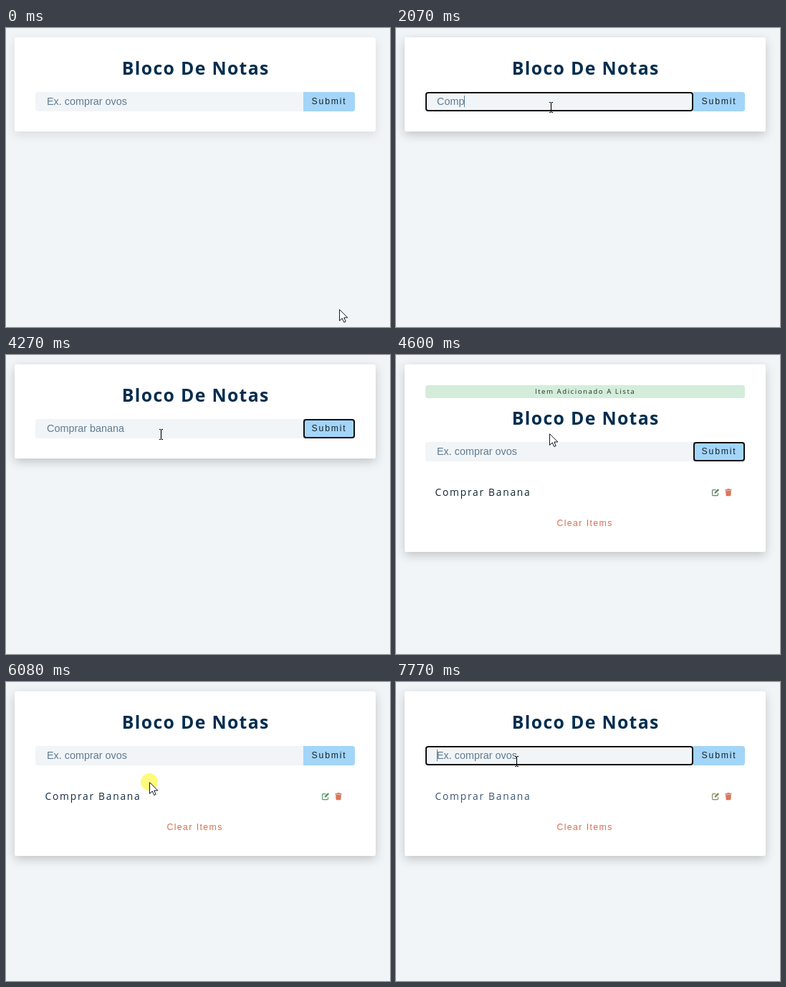
Recreate the animation shown at these times as an HTML page. Size 536 px wide and 416 px high, loop 8 s.

```html
<!DOCTYPE html>
<html lang="pt">
<head>
<meta charset="utf-8">
<title>Bloco De Notas</title>
<style>
  html, body { margin: 0; height: 100%; overflow: hidden; background: #f1f5f8; }
  svg { display: block; width: 100vw; height: 100vh; }
  text { white-space: pre; }
  .ui { font-family: "Open Sans", "Noto Sans", sans-serif; }
  .form { font-family: "Liberation Sans", Arial, sans-serif; }
  .ring { fill: none; stroke: #101010; stroke-width: 2; }
  #title { font-size: 24.8px; font-weight: 700; letter-spacing: 1.34px; fill: #062d4f; }
  #value { font-size: 14.4px; fill: #607b90; }
  #submit { font-size: 12.24px; letter-spacing: 1.8px; fill: #14202f; }
  #clear { font-size: 12.24px; letter-spacing: 1.44px; fill: #d4704f; }
  #note { font-size: 9.7px; letter-spacing: 1.5px; fill: #1d3326; }
  #name { font-size: 13.8px; letter-spacing: 1.74px; }
</style>
</head>
<body>
<svg viewBox="0 0 536 416">
  <defs>
    <filter id="soft" filterUnits="userSpaceOnUse" x="-30" y="-30" width="600" height="370">
      <feDropShadow id="shadow" dx="0" dy="4.5" stdDeviation="6.75" flood-color="#000" flood-opacity=".1"/>
    </filter>
  </defs>
  <rect width="536" height="416" fill="#f1f5f8"/>
  <rect id="card" x="12" y="13" width="504" height="131" rx="3.6" fill="#fff" filter="url(#soft)"/>
  <g id="alert">
    <rect x="41" y="42" width="446" height="18" rx="3.6" fill="#d4edda"/>
    <text id="note" class="ui" x="194" y="54">Item Adicionado A Lista</text>
  </g>
  <g id="body">
    <text id="title" class="ui" x="161.8" y="65">Bloco De Notas</text>
    <path d="M415 89H44.6a3.6 3.6 0 0 0-3.6 3.6v19.8a3.6 3.6 0 0 0 3.6 3.6H415z" fill="#f1f5f8"/>
    <path d="M415 89h68.4a3.6 3.6 0 0 1 3.6 3.6v19.8a3.6 3.6 0 0 1-3.6 3.6H415z" fill="#a3d5f8"/>
    <text id="value" class="form" x="57" y="107"></text>
    <rect id="caret" y="94" width="1" height="16" fill="#607b90"/>
    <text id="submit" class="form" x="426.6" y="106">Submit</text>
    <rect id="inputRing" class="ring" x="42" y="90" width="372" height="25" rx="3"/>
    <rect id="buttonRing" class="ring" x="416" y="90" width="70" height="25" rx="3"/>
    <g id="list">
      <text id="name" class="ui" x="54.6" y="164">Comprar Banana</text>
      <g id="edit">
        <path d="M446.5 155.6h-4a1 1 0 0 0-1 1v6a1 1 0 0 0 1 1h6a1 1 0 0 0 1-1v-2.6" fill="none" stroke="currentColor" stroke-width="1.1"/>
        <path d="M444.6 160.8l.4-2.2 4.4-4.4 1.7 1.7-4.4 4.4z" fill="currentColor"/>
      </g>
      <path d="M459.4 155h2.6l.6-1h2.8l.6 1h2.6v1.4h-9.2zM460.1 157h7.8l-.5 6.3a1 1 0 0 1-1 .9h-4.8a1 1 0 0 1-1-.9z" fill="#d8775a"/>
      <text id="clear" class="form" x="224.4" y="206">Clear Items</text>
    </g>
  </g>
  <circle id="click" r="12" fill="#fdfa7c"/>
  <path id="arrow" d="M.5.7V16.4L4.2 12.9 6.8 18.5 9.2 17.4 6.8 12H11.8z" fill="#fff" stroke="#111827"/>
  <path id="beam" d="M-2-6.5H0M1-6.5H3M-2 7.5H0M1 7.5H3M.5-6V7" fill="none" stroke="#000" stroke-width="1.1"/>
</svg>
<script>
const LOOP = 8000, TICK = 65;
const el = {};
document.querySelectorAll('[id]').forEach(e => el[e.id] = e);

const phrase = 'Comprar banana';
// [time, letters in the field], with one correction near the end
const keys = [[1480, 1], [1810, 2], [1940, 3], [2070, 4], [2200, 5], [2270, 6], [2340, 7], [2470, 8],
  [2870, 9], [3000, 10], [3070, 11], [3210, 12], [3470, 11], [3600, 10], [3670, 11], [3740, 12], [3800, 13], [3930, 14]];

// [start, steps, x, y]: the pointer travels there in ticks
const moves = [[70, 13, 216, 110], [4600, 1, 214, 109], [5550, 1, 214, 108], [5810, 3, 200, 139], [7010, 10, 168, 110]];
const clicks = [930, 6080, 7700];

const within = (t, a, b) => t >= a && t < b;
const clamp = u => Math.min(1, Math.max(0, u));
const ease = u => u < .5 ? 4 * u ** 3 : 1 - 4 * (1 - u) ** 3;
const show = (e, on) => e.setAttribute('visibility', on ? 'visible' : 'hidden');
const place = (e, x, y) => e.setAttribute('transform', `translate(${x} ${y})`);

function pointer(t) {
  let x = 465, y = 391;
  for (const [start, steps, tx, ty] of moves) {
    if (t < start) break;
    const p = ease(clamp((Math.floor((t - start) / TICK) + 1) / steps));
    x += (tx - x) * p;
    y += (ty - y) * p;
  }
  return [Math.round(x), Math.round(y)];
}

function render(t) {
  const added = t >= 4600, alert = within(t, 4600, 5810), drop = alert ? 32 : 0;
  const focused = within(t, 930, 4200) || t >= 7700;

  el.card.setAttribute('height', added ? 229 + drop : 131);
  el.shadow.setAttribute('flood-opacity', .1 + .1 * clamp((t - 420) / 300));
  show(el.alert, alert);
  show(el.list, added);
  place(el.body, 0, drop);

  let typed = '';
  if (!added) for (const [at, n] of keys) if (t >= at) typed = phrase.slice(0, n);
  el.value.textContent = typed || 'Ex. comprar ovos';
  const width = typed ? el.value.getComputedTextLength() : 0;
  el.caret.setAttribute('x', Math.round(57 + width));
  show(el.caret, focused);
  show(el.inputRing, focused);
  show(el.buttonRing, within(t, 4200, 6080));

  el.name.setAttribute('fill', alert ? '#10252b' : t < 7010 ? '#142c42' : '#3a5570');
  el.edit.setAttribute('color', alert ? '#5f8468' : t < 7010 ? '#4f9a5c' : '#858a58');

  const [x, y] = pointer(t);
  const overField = within(x, 41, 415) && within(y, 89 + drop, 116 + drop);
  show(el.arrow, !overField);
  show(el.beam, overField);
  show(el.click, clicks.some(c => within(t, c, c + 70)));
  [el.arrow, el.beam, el.click].forEach(e => place(e, x, y));
}

const begin = performance.now();
function loop() {
  render((performance.now() - begin) % LOOP);
  requestAnimationFrame(loop);
}
loop();
</script>
</body>
</html>
```
